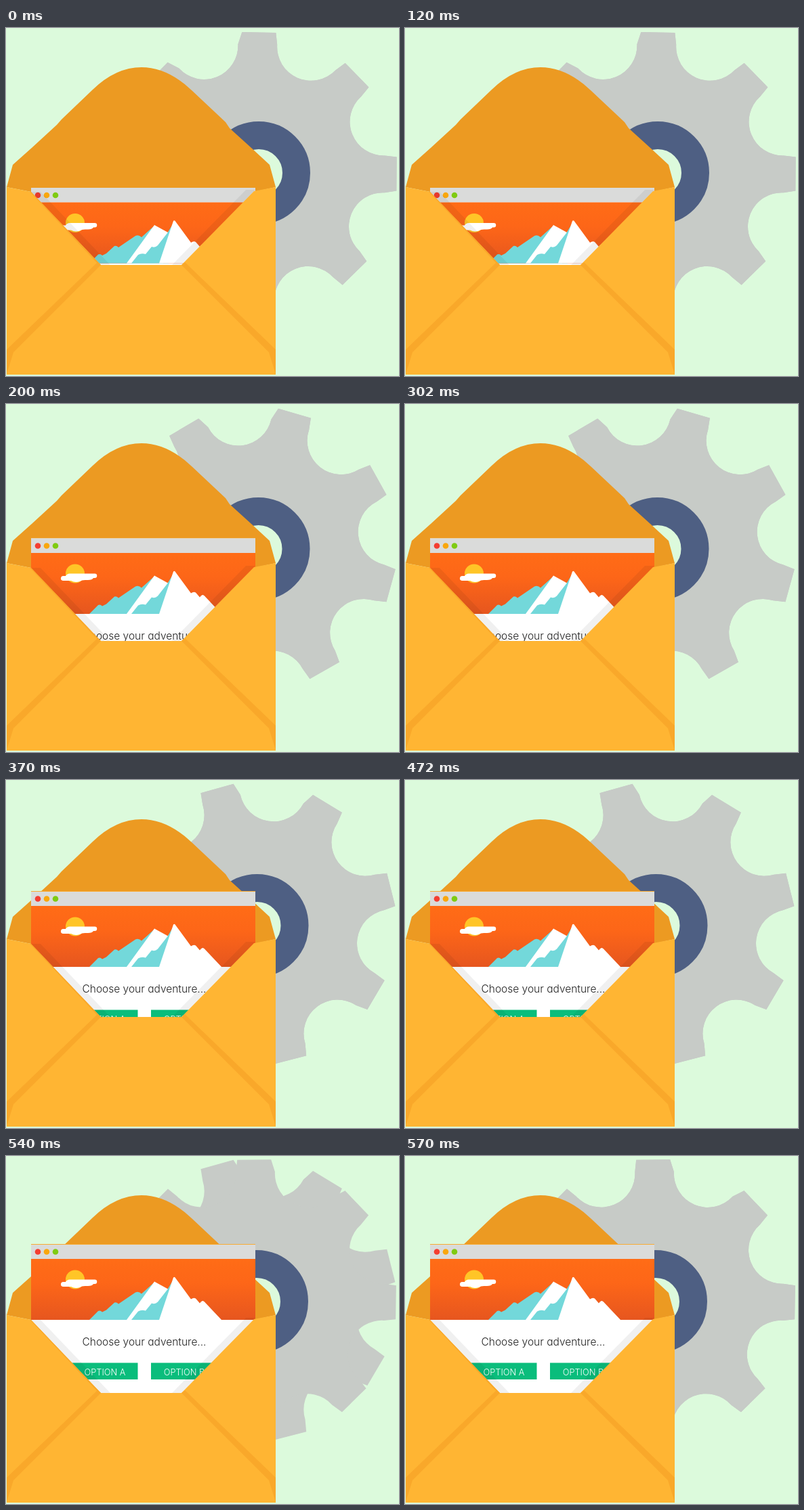
These frames come from a looping animation (580 by 514 pixels, 0.7 s). An HTML page:

```html
<!DOCTYPE html>
<html lang="en">
<head>
<meta charset="utf-8">
<title>Envelope and gear</title>
<style>
  html, body { margin: 0; width: 100%; height: 100%; overflow: hidden; background: #dcfadc; }
  svg { display: block; }
  text { font-family: Inter, "Open Sans", sans-serif; font-weight: 300; text-anchor: middle; font-feature-settings: "cv11"; }
</style>
</head>
<body>
<svg width="580" height="514" viewBox="0 0 580 514">
  <defs>
    <linearGradient id="sky" x2="0" y2="1">
      <stop stop-color="#ff6c16"/>
      <stop offset=".4" stop-color="#fd6618"/>
      <stop offset="1" stop-color="#e6561f"/>
    </linearGradient>
  </defs>

  <g fill="#c7cbc7">
    <path class="gear"/>
    <path class="gear"/>
  </g>
  <circle id="hub" r="55.5" fill="#dcfadc" stroke="#4e5f83" stroke-width="41"/>

  <path fill="#ec9a22" d="M1 235 10 202 38 177 75 143 82 135 128 91Q162 58 200 58T274 92L324 139 330 148 362 177 389 202 398 235 366 242V300H37V242Z"/>

  <!-- page, origin at its top edge -->
  <g id="page">
    <path fill="#fff" d="M37 0H368V230H37Z"/>
    <path fill="#dadbda" d="M37 0H368V21.5H37Z"/>
    <path id="rim" fill="#f9ab33" d="M37-.5H368V.5H37Z"/>
    <circle cx="47" cy="11" r="4.3" fill="#f43d30"/>
    <circle cx="60" cy="11" r="4.3" fill="#f9a70d"/>
    <circle cx="73" cy="11" r="4.3" fill="#7fcb12"/>
    <path fill="url(#sky)" d="M37 21.5H368V111.5H37Z"/>
    <circle cx="102" cy="52" r="14" fill="#ffc527"/>
    <path fill="#fff" d="M85 55.5H88Q90 52 94 52H131A3 3 0 0 1 131 58.5H129Q127 62 119 61.5 112 61 109 63.5 102 66 96 62.5H84A3.5 3.5 0 0 1 85 55.5Z"/>
    <path fill="#73d8da" d="M123 111.5 136 98.500Q139 97 142 100L148 97 160 86Q163 85 166 88L191 71Q196 69 200 73L220 55V111.5Z"/>
    <path fill="#fff" d="M178 111.500 219 55 240 66.500 232 111.5Z"/>
    <path fill="#73d8da" d="M185 111.500 195 99Q200 96 206 98L215 87Q220 89 224 85L238 67 249 49 240 111.5Z"/>
    <path fill="#fff" d="M226 111.500 247 49Q249 47 251 51L273 81Q277 78 280 80L286 87Q290 81 293 85L318 111.5Z"/>
    <text x="204" y="149" font-size="15.500" fill="#222">Choose your adventure...</text>
    <path fill="#0abd7c" d="M97 175H194.500V199.500H97ZM214 175H311V199.500H214Z"/>
    <g font-size="12.800" fill="#fff">
      <text x="146" y="193">OPTION A</text>
      <text x="263" y="193">OPTION B</text>
    </g>
  </g>

  <path fill="#000" fill-opacity=".06" d="M37 242 140 350H154L51 242ZM368 239 259 350H245L354 239H368Z"/>
  <path fill="#ffb533" d="M1 235 37 242 140 350H259L366 241 398 235V512H1Z"/>
  <g fill="#f9a82a">
    <path d="M135 346 140 350 11 479 1 511V475Z"/>
    <path d="M264 346 259 350 388 479 398 511V475Z"/>
    <path d="M35 241.600 37 242 140 350H137Z"/>
  </g>
</svg>
<script>
const LOOP = 700, TEETH = 8, RADIUS = 207.5;
const skew = [1.2, .9, .4, .5, 0, 0, 0, -.5]; // slight unevenness of the teeth, degrees

// Point at distance `out` along a clockwise angle from north, shifted sideways
function polar(angle, side, out) {
  const a = angle * Math.PI / 180, s = Math.sin(a), c = Math.cos(a);
  return `${(out * s + side * c).toFixed(2)} ${(side * s - out * c).toFixed(2)}`;
}

function gearPath() {
  const toothAngle = k => k * 360 / TEETH + skew[k % TEETH];
  let d = "";
  for (let k = 0; k < TEETH; k++) {
    const tooth = toothAngle(k), gap = (tooth + toothAngle(k + 1)) / 2;
    d += `${k ? "L" : "M"}${polar(tooth, -25, RADIUS)}L${polar(tooth, 25, RADIUS)}`
       + `L${polar(gap, -47, 186)}A50 50 0 0 0 ${polar(gap, 47, 186)}`;
  }
  return d + "Z";
}

// Gear turns 15 degrees per step while the page rises; [x, y, angle]
const turns = [[369, 214, 0], [368, 213, 15], [367, 212.5, 30], [368, 213, 45]];
const poses = [
  { from: 0,   top: 236,   hub: [373, 214],   gears: [0] },
  { from: 200, top: 198.5, hub: [372.5, 214], gears: [1] },
  { from: 370, top: 164.5, hub: [370.5, 215], gears: [2], rim: true },
  { from: 540, top: 130.5, hub: [370, 215],   gears: [2, 3], rim: true },
  { from: 570, top: 130.5, hub: [370, 215],   gears: [3], rim: true }
];

const byId = id => document.getElementById(id);
const page = byId("page"), hub = byId("hub"), rim = byId("rim");
const gears = [...document.querySelectorAll(".gear")];
const outline = gearPath();
gears.forEach(g => g.setAttribute("d", outline));

function draw(time) {
  const pose = poses.findLast(p => p.from <= time);
  page.setAttribute("transform", `translate(0 ${pose.top})`);
  hub.setAttribute("transform", `translate(${pose.hub})`);
  rim.setAttribute("visibility", pose.rim ? "visible" : "hidden");
  gears.forEach((gear, i) => {
    const [x, y, angle] = turns[pose.gears[i] ?? pose.gears[0]];
    gear.setAttribute("transform", `translate(${x} ${y}) rotate(${angle})`);
  });
}

const start = performance.now();
function tick() {
  draw((performance.now() - start) % LOOP);
  requestAnimationFrame(tick);
}
tick();
</script>
</body>
</html>
```
